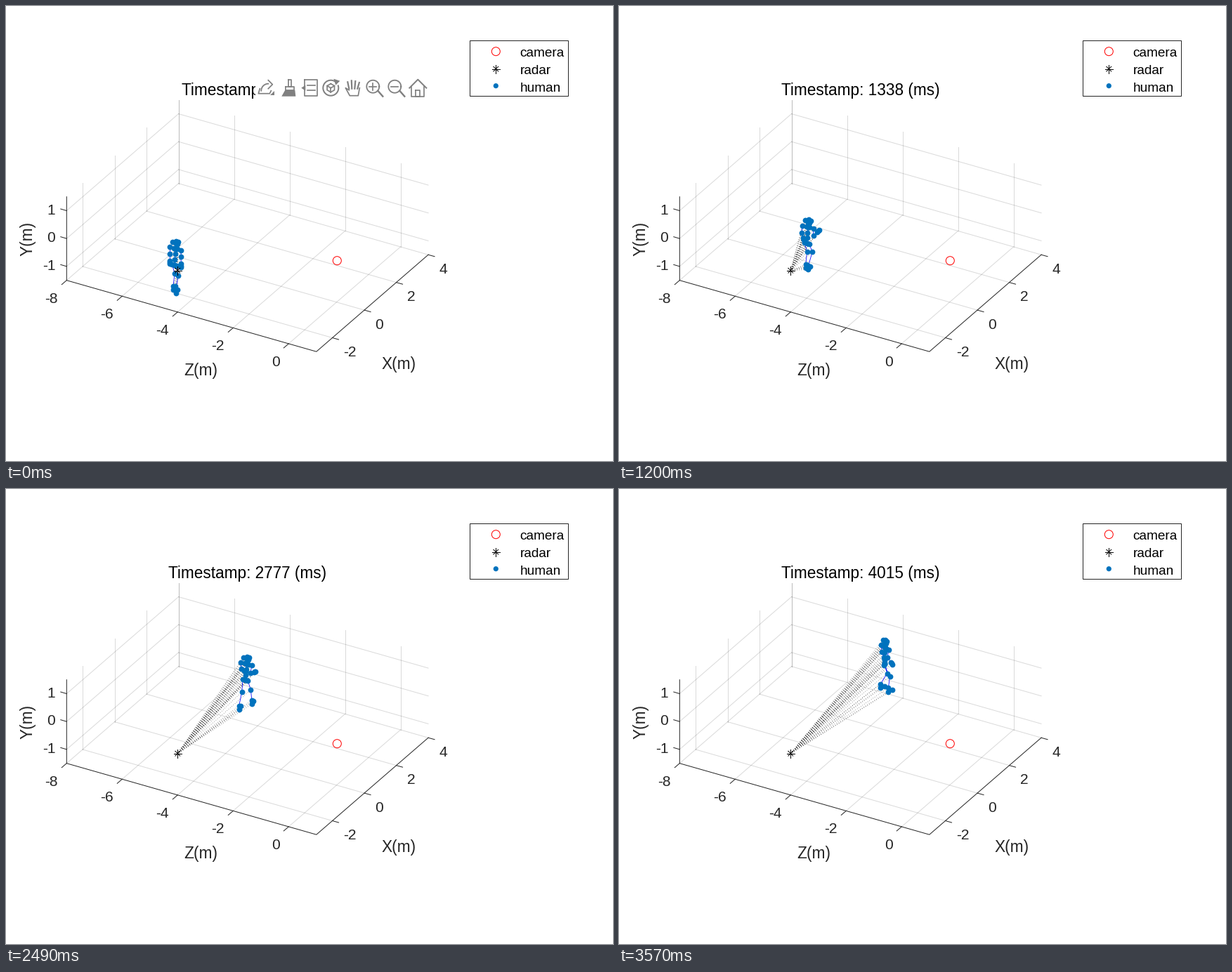
Recreate the animation shown at these times as a matplotlib script. Size 864 by 648 pixels, loop 3.6 s.

```python
import matplotlib.pyplot as plt
import numpy as np
from matplotlib.animation import FuncAnimation
from matplotlib.patches import Circle, Polygon, Rectangle

W, H, DPI = 864, 648, 100
FRAMES, STEP = 120, 30
PT = 72 / DPI
INK, DOT, ICON = "#262626", "#0072bd", "#808080"
RADAR = np.array([244, 376])

# Pixels per metre along the three axes.
EX, EY, EZ = np.array([[22.75, -19.71], [0, -39.67], [39.5, 11.28]])

plt.rcParams["font.family"] = "Liberation Sans"
fig = plt.figure(figsize=(W / DPI, H / DPI), dpi=DPI, facecolor="white")
ax = fig.add_axes([0, 0, 1, 1])
# Offsets keep whole coordinates on pixel centres after line snapping.
ax.set_xlim(-0.3, W - 0.3)
ax.set_ylim(H - 0.7, -0.7)
ax.axis("off")


def line(pts, color=INK, width=1, **kw):
    x, y = np.array(pts, float).T
    return ax.plot(x, y, color=color, lw=width * PT, **kw)[0]


def label(x, y, s, size, ha="center", color=INK, **kw):
    return ax.text(x, y, s, fontsize=size * PT, ha=ha, va="baseline", color=color, **kw)


def project(x, y, z):
    return np.array([86, 390]) + (x + 3) * EX + (y + 1.5) * EY + (z + 8) * EZ


# ---- axes box -------------------------------------------------------------
def grid(a, b):
    line([project(*a), project(*b)], alpha=0.17, zorder=1)


for z in range(-8, 1, 2):
    grid((-3, -1.5, z), (4, -1.5, z))
    grid((4, -1.5, z), (4, 1.5, z))
for x in range(-2, 5, 2):
    grid((x, -1.5, -8), (x, -1.5, 1))
    grid((x, -1.5, -8), (x, 1.5, -8))
for y in (-1, 0, 1):
    grid((-3, y, -8), (4, y, -8))
    grid((4, y, -8), (4, y, 1))

line([project(-3, 1.5, -8), project(-3, -1.5, -8),
      project(-3, -1.5, 1), project(4, -1.5, 1)], zorder=2)


def tick(p, d, text, shift, ha):
    line([p, p + d], zorder=2)
    label(p[0] + shift[0], p[1] + shift[1], text, 21, ha)


for z in range(-8, 1, 2):
    tick(project(-3, -1.5, z), (-7, 6), str(z), (-12.5, 32), "right")
for x in range(-2, 5, 2):
    tick(project(x, -1.5, 1), (9, 2.5), str(x), (15.5, 26.5), "left")
for y in (-1, 0, 1):
    tick(project(-3, y, -8), (-8.5, -2.5), str(y), (-16, 5), "right")

label(276.5, 525, "Z(m)", 22.8)
label(559, 516.5, "X(m)", 22.8)
label(37.5, 331, "Y(m)", 22.8, rotation=90, rotation_mode="anchor")
title = label(343.5, 126, "", 22.6, color="black", zorder=8)


# ---- markers and legend ---------------------------------------------------
def ring(x, y):
    ax.add_patch(Circle((x, y), 6, fill=False, ec="red", lw=PT, zorder=5))


def star(x, y):
    for k in range(4):
        a = k * np.pi / 4
        d = (5.8 - k % 2) * np.array([np.cos(a), np.sin(a)])
        line([(x, y) - d, (x, y) + d], "black", zorder=7)


ring(471, 362)
star(*RADAR)
ax.add_patch(Rectangle((660, 48), 140, 79, fc="white", ec=INK, lw=PT, zorder=4))
ring(697, 64)
star(697, 89)
ax.add_patch(Circle((697, 113), 3.6, fc=DOT, ec="none", zorder=5))
for i, name in enumerate(("camera", "radar", "human")):
    label(731, 71 + 25 * i, name, 19, "left", "black", zorder=5)

# ---- toolbar, shown only at the start -------------------------------------
toolbar = [ax.add_patch(Rectangle((355, 102), 246, 31, fc="white", ec="none", zorder=9))]


def stroke(*pts, width=1.7):
    toolbar.append(line(pts, ICON, width, zorder=10, solid_joinstyle="round"))


def fill(*pts):
    toolbar.append(ax.add_patch(Polygon(pts, fc=ICON, ec="none", zorder=10)))


def box(x, y, w, h):
    stroke((x, y), (x + w, y), (x + w, y + h), (x, y + h), (x, y))


def arc(x, y, r, start, end, width=1.8):
    a = np.linspace(start, end, 40)
    stroke(*np.c_[x + r * np.cos(a), y + r * np.sin(a)], width=width)


# share
stroke((361, 117), (359, 124), (375, 124), (377, 120))
arc(373, 120, 10, np.pi, 1.5 * np.pi)
stroke((373, 105), (379, 111), (373, 117))
fill((376, 126), (382, 126), (382, 120))
# brush
box(402, 104, 4, 10)
box(398, 114, 12, 5)
fill((397, 119), (411, 119), (412, 128), (392, 128))
# data tip
box(425, 104, 18, 23)
fill((420, 116), (426, 112), (426, 120))
for y in (112, 119):
    stroke((429, y), (440, y))
# rotate
arc(462, 116, 11, -0.3, 5.2, 2)
fill((466, 103), (475, 106), (469, 112))
hexagon = [(462 + 6 * np.sin(a), 116 - 6 * np.cos(a))
           for a in np.arange(7) * np.pi / 3]
stroke(*hexagon)
for k in (1, 3, 5):
    stroke((462, 116), hexagon[k])
# hand
for k in range(4):
    stroke((488 + 4 * k, 117), (486 + 5.5 * k, 105 + 2 * abs(k - 1.3)), width=2.2)
stroke((488, 119), (483, 116), (489, 127), (501, 127), (503, 116))
# zoom in, zoom out
for cx in (522, 553):
    arc(cx, 114, 9, 0, 2 * np.pi)
    stroke((cx + 7, 120), (cx + 14, 128), width=2.4)
    stroke((cx - 5, 114), (cx + 5, 114))
stroke((522, 109), (522, 119))
# home
stroke((574, 116), (586, 104), (598, 116), width=2)
stroke((577, 114), (577, 128), (595, 128), (595, 114))
box(583, 119, 6, 9)

# ---- walking figure -------------------------------------------------------
START = np.array([239.5, 368])  # pelvis on the stage at rest
UP = np.array([0, 1, 0])
CYCLE = 33.3                    # frames per two steps
SPEED = 0.075                   # metres per frame
LEG, ARM = 0.43, 0.25           # segment lengths


def smooth(t, a, b):
    u = np.clip((t - a) / (b - a), 0, 1)
    return u * u * (3 - 2 * u)


def ramp(t, a):
    """Zero before a, slope one after it, with a soft corner."""
    return 4 * np.logaddexp(0, (t - a) / 4)


def root(t):
    x = SPEED * (ramp(t, 21) - ramp(t, 100))
    z = -0.12 * smooth(t, 5, 30) + 0.2 * smooth(t, 102, 119)
    return np.array([x, 0.018 * x, z])


def facing(yaw):
    """Forward and rightward unit vectors."""
    c, s = np.cos(yaw), np.sin(yaw)
    return np.array([c, 0, s]), np.array([-s, 0, c])


def arm(neck, fwd, out, swing, bend):
    def reach(angle):
        return np.sin(angle) * fwd - np.cos(angle) * UP

    shoulder = neck + 0.2 * out
    elbow = shoulder + ARM * reach(swing)
    fore = ARM * reach(swing + bend)
    wrist = elbow + fore
    return [neck, neck + 0.06 * out, shoulder, elbow, wrist,
            wrist + 0.25 * fore, wrist + 0.45 * fore]


def leg(pelvis, fwd, out, phase, stride):
    hip = pelvis + 0.09 * out
    lift = 0.08 * stride / 0.24 * max(0, -np.sin(phase))
    ankle = hip + stride * np.cos(phase) * fwd + (lift - 0.82) * UP
    half = np.linalg.norm(ankle - hip) / 2
    knee = (hip + ankle) / 2 + np.sqrt(max(0, LEG**2 - half**2)) * fwd
    return [pelvis, hip, knee, ankle, ankle + 0.12 * fwd - 0.07 * UP,
            ankle - 0.13 * UP]


def chains(t):
    """Joint chains of the body on the stage, each one run of bones."""
    pelvis = root(t)
    walk = smooth(t, 5, 35) - 0.6 * smooth(t, 105, 119)
    phase = np.pi + 2 * np.pi * t / CYCLE
    stride = 0.08 + 0.16 * walk
    yaw = 1.1 * smooth(t, 85, 108)
    fwd, right = facing(yaw)
    chest_fwd, chest_right = facing(0.4 * yaw)

    spine = [pelvis + h * UP + 0.06 * h * chest_right for h in (0, 0.2, 0.4, 0.6, 0.78)]
    neck, head = spine[3], pelvis + 0.84 * UP + 0.05 * chest_right
    face = [head + a * chest_right + b * UP
            for a, b in ((-0.12, -0.03), (0, 0.03), (0.08, 0.02), (0.05, -0.07))]
    runs = [spine, [spine[4]] + face]
    for side in (-1, 1):
        beat = phase + (np.pi if side < 0 else 0)
        swing = -0.3 * walk * (0.5 + np.cos(beat))
        bend = walk * (1.2 + 0.5 * side)
        runs.append(arm(neck, chest_fwd, side * chest_right, swing, bend))
        runs.append(leg(pelvis, fwd, side * right, beat, stride))
    return [START + np.array(r) @ np.array([EX, EY, EZ]) for r in runs]


rays, = ax.plot([], [], color="0.4", lw=0.75 * PT, ls=(0, (1, 3)), zorder=3)
bones, = ax.plot([], [], color="blue", lw=0.8 * PT, zorder=5)
joints, = ax.plot([], [], "o", color=DOT, ms=7.8 * PT, mew=0, zorder=6)
GAP = np.array([[np.nan, np.nan]])


def update(n):
    k = n + (n > 110)
    title.set_text(f"Timestamp: {round(33.455 * k)} (ms)")
    runs = chains(n)
    points = np.vstack(runs)
    bones.set_data(*np.vstack([np.vstack([r, GAP]) for r in runs]).T)
    joints.set_data(*points.T)
    rays.set_data(*np.vstack([np.vstack([RADAR, p, GAP]) for p in points]).T)
    for part in toolbar:
        part.set_visible(n == 0)
    return [title, bones, joints, rays, *toolbar]


anim = FuncAnimation(fig, update, frames=FRAMES, interval=STEP, repeat=True,
                     repeat_delay=0)
plt.show()
```
